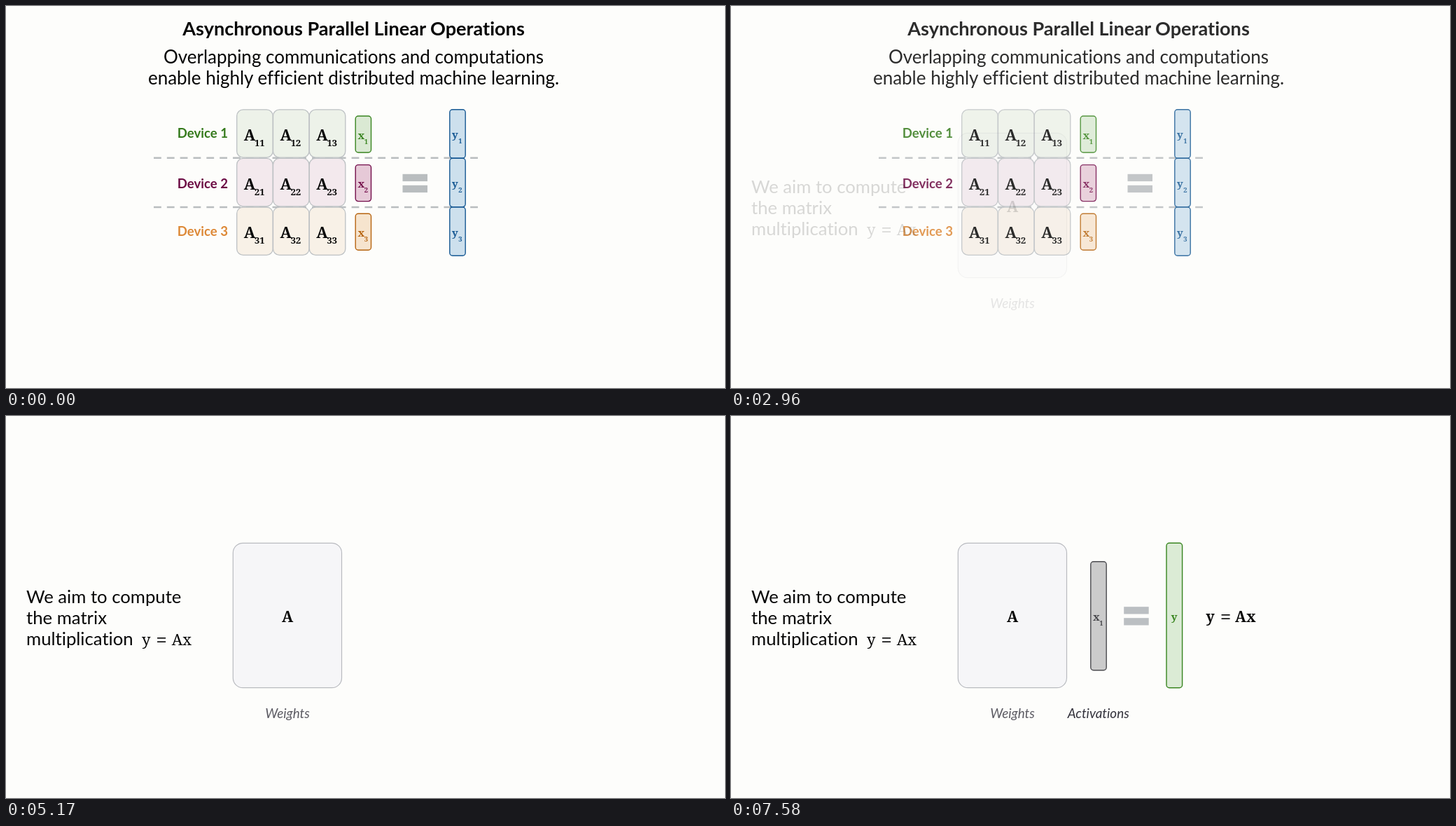
Animation of 1027x545 px, one loop 8 s. Source, as an HTML page:

```html
<!DOCTYPE html>
<html lang="en">
<head>
<meta charset="utf-8">
<title>Parallel matrix multiplication</title>
<style>
  html, body { margin: 0; width: 100%; height: 100%; overflow: hidden; background: #fdfdfb; }
  svg { display: block; width: 1027px; height: 545px; }
  text {
    font-family: Lato, "Open Sans", sans-serif;
    font-variant-ligatures: none;
    white-space: pre;
  }
  .title { font-size: 27.1px; font-weight: 700; }
  .body { font-size: 26px; }
  .lead { font-size: 25.7px; }
  .device { font-size: 18.6px; font-weight: 700; }
  .note { font-size: 18.9px; font-style: italic; }
  .math { font-family: "Noto Serif", "DejaVu Serif", serif; }
  .bold { font-weight: 600; }
  .blend { mix-blend-mode: multiply; }
</style>
</head>
<body>
<svg id="stage" viewBox="0 0 1027 545"></svg>
<script>
const LOOP = 8000;
const INK = '#060606', GRAY = '#bbbfc2', GREEN = '#38851f', BLUE = '#175a96';
const stage = document.getElementById('stage');

function add(parent, tag, attrs, content) {
  const el = document.createElementNS('http://www.w3.org/2000/svg', tag);
  for (const key in attrs) el.setAttribute(key, attrs[key]);
  if (content) el.textContent = content;
  return parent.appendChild(el);
}

const group = (cls = '') => add(stage, 'g', { class: cls });

function box(g, x, y, width, height, rx, fill, stroke, line = 1.4) {
  add(g, 'rect', { x, y, width, height, rx, fill, stroke, 'stroke-width': line });
}

function label(g, str, x, y, cls, fill = INK, anchor = 'start') {
  add(g, 'text', { x, y, fill, class: cls, 'text-anchor': anchor }, str);
}

function math(g, str, x, y, size, fill = INK, weight = 'bold', anchor = 'start') {
  add(g, 'text', {
    x, y, fill, class: 'math ' + weight, 'text-anchor': anchor, 'font-size': size
  }, str);
}

function indexed(g, name, index, x, y, fill) {
  math(g, name, x, y, 15, fill);
  math(g, index, x + 9.3, y + 7, 9.5, fill);
}

function equals(g, x, y) {
  for (const dy of [0, 16]) {
    add(g, 'rect', { x, y: y + dy, width: 35.5, height: 10.3, fill: GRAY });
  }
}

function formula(g, x, y, size, weight) {
  math(g, 'y', x, y, size, INK, weight);
  math(g, '=', x + 28, y + 2, 28, INK, '', 'middle');
  math(g, 'Ax', x + 71, y, size, INK, weight, 'end');
}

// Single product, revealed in three parts
const weights = group();
['We aim to compute', 'the matrix', 'multiplication'].forEach((line, i) =>
  label(weights, line, 29, 267 + i * 30.2, 'lead'));
formula(weights, 194, 327.3, 22, '');
box(weights, 324.3, 181.3, 155.2, 206.4, 14, '#f6f6f8', '#b9bbc0', 1.2);
math(weights, 'A', 402, 293.5, 21.5, INK, 'bold', 'middle');
label(weights, 'Weights', 402, 431, 'note', '#5c5b63', 'middle');

const inputs = group();
box(inputs, 513.8, 207.8, 22.4, 155, 4, '#cbcbcb', '#4c4c50');
indexed(inputs, 'x', 1, 517, 292, '#46464a');
equals(inputs, 561.2, 272.2);
label(inputs, 'Activations', 524.7, 431, 'note', '#33323c', 'middle');

const result = group();
box(result, 622, 181.3, 22.6, 206.4, 4, '#dbebd5', GREEN);
math(result, 'y', 633, 291.5, 15, GREEN, 'bold', 'middle');
formula(result, 678.5, 293.5, 21, 'bold');

// Overview: three devices, each holding one row of the product
const overview = group('blend');
label(overview, 'Asynchronous Parallel Linear Operations', 496.5, 42, 'title', INK, 'middle');
label(overview, 'Overlapping communications and computations', 496.5, 81.5, 'body', INK, 'middle');
label(overview, 'enable highly efficient distributed machine learning.', 496.5, 112, 'body', INK, 'middle');

for (const y of [216.7, 287]) {
  add(overview, 'path', {
    d: `M211 ${y}H674`, stroke: GRAY, 'stroke-width': 2.6, 'stroke-dasharray': '10.8 8.04'
  });
}

const devices = [
  { name: '#357b1c', cell: '#eff4ed', fill: '#dcebd7', edge: GREEN, base: 188 },
  { name: '#6d0b45', cell: '#f5ebf1', fill: '#e8cbdb', edge: '#740d4b', base: 259.5 },
  { name: '#df8a38', cell: '#faf3eb', fill: '#f8e6d2', edge: '#b8650f', base: 328 }
];

devices.forEach((dev, row) => {
  const top = 147.8 + row * 69.6, n = row + 1;
  label(overview, 'Device ' + n, 317, dev.base, 'device', dev.name, 'end');
  for (let col = 0; col < 3; col++) {
    const x = 329.7 + col * 51.8;
    box(overview, x, top, 51.5, 68.4, 9, dev.cell, '#bfc3c7', 1.3);
    math(overview, 'A', x + 10, top + 44.2, 22);
    math(overview, `${n}${col + 1}`, x + 25.2, top + 52.2, 13);
  }
  box(overview, 499.2, top + 9.2, 22.3, 52, 4, dev.fill, dev.edge);
  indexed(overview, 'x', n, 502.5, top + 41.8, dev.edge);
  box(overview, 633.8, top, 22.4, 69.2, 4, '#cfe2f1', BLUE);
  indexed(overview, 'y', n, 637, top + 41.5, BLUE);
});
equals(overview, 566.5, 239.8);

const clamp = v => Math.min(1, Math.max(0, v));
const smooth = v => v * v * (3 - 2 * v);

// Quick start with a long tail: cubic-bezier(.25, .1, .25, 1)
function ease(v) {
  if (v <= 0 || v >= 1) return clamp(v);
  let lo = 0, hi = 1, s = v;
  for (let i = 0; i < 20; i++) {
    s = (lo + hi) / 2;
    const x = 0.75 * s * (1 - s) + s ** 3;
    if (x < v) lo = s; else hi = s;
  }
  return 0.3 * s * (1 - s) ** 2 + 3 * s * s * (1 - s) + s ** 3;
}

const span = (t, start, length) => clamp((t - start) / length);
const show = (g, alpha) => g.setAttribute('opacity', alpha.toFixed(3));

function draw(now) {
  const t = now % LOOP;
  const swap = ease(span(t, 2895, 500));
  show(overview, 1 - swap);
  show(weights, swap);
  show(inputs, smooth(span(t, 5710, 370)));
  show(result, smooth(span(t, 7210, 370)));
}

const start = performance.now();
function tick() {
  draw(performance.now() - start);
  requestAnimationFrame(tick);
}
tick();
</script>
</body>
</html>
```
